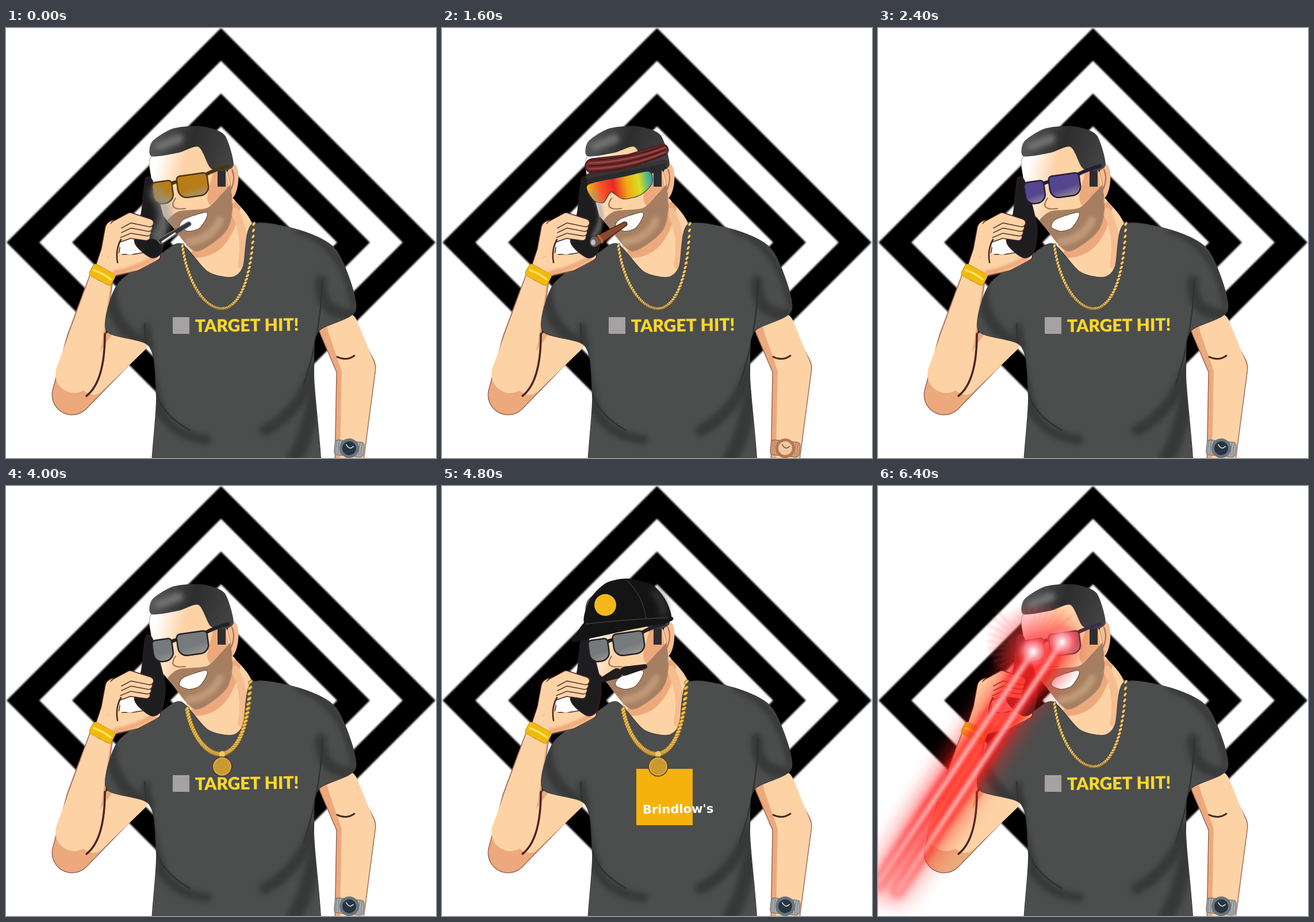
An HTML page with a canvas that plays this animation: 748 by 748 pixels, repeating every 7200 ms.

```html
<!DOCTYPE html>
<html lang="en">
<head>
<meta charset="utf-8">
<title>Wardrobe loop</title>
<style>
html, body { margin: 0; width: 100%; height: 100%; overflow: hidden; background: #fff; }
canvas { display: block; width: 748px; height: 748px; }
</style>
</head>
<body>
<canvas id="stage" width="748" height="748"></canvas>
<script>
const ctx = document.getElementById('stage').getContext('2d');
const STEP = 800;
const SKIN = '#fdd3a6', SHADE = '#eda97c', LINE = '#4a2520';

const GREY = { lens: '#777a7c', rim: '#202124' };
const VIOLET = { lens: '#55458f', rim: '#211e35' };
const GOLD = { lens: '#b97d16', rim: '#49350f' };
const ROSY = { lens: '#c05a68', rim: '#3a3046' };
const HATS = {
  black: { tone: '#141415', seam: '#353536', badge: '#f4b71c', tip: [226, 271] },
  grey: { tone: '#3b3b41', seam: '#28282c', badge: '#ef641c', tip: [212, 283] }
};

const LOOKS = [
  { shades: GOLD, chain: 'curb', smoke: 'dark' },
  { shades: GREY, hat: 'black', mask: true, white: true, chain: 'iced' },
  { band: true, chain: 'curb', smoke: 'cigar', rose: true },
  { shades: VIOLET, chain: 'curb' },
  { shades: VIOLET, hat: 'grey', chain: 'rope', pendant: '#f06a1d', rose: true },
  { shades: GREY, chain: 'rope', pendant: '#c99a32' },
  { shades: GREY, hat: 'black', moustache: true, diner: true, chain: 'rope', pendant: '#c99a32' },
  { shades: GREY, hat: 'black', chain: 'curb' },
  { shades: ROSY, chain: 'curb', laser: true }
];

function paintPath(color, edge, width = 1.5) {
  if (edge) {
    ctx.strokeStyle = edge;
    ctx.lineWidth = width * 2;
    ctx.stroke();
  }
  ctx.fillStyle = color;
  ctx.fill();
}

// Closed smooth outline through a few x, y pairs.
function outline(p) {
  const n = p.length;
  const at = i => p[(i + n) % n];
  ctx.beginPath();
  ctx.moveTo(p[0], p[1]);
  for (let i = 0; i < n; i += 2) {
    const pull = (k, a, b) => at(k) + (at(a) - at(b)) * 0.13;
    ctx.bezierCurveTo(pull(i, i + 2, i - 2), pull(i + 1, i + 3, i - 1),
      pull(i + 2, i, i + 4), pull(i + 3, i + 1, i + 5), at(i + 2), at(i + 3));
  }
  ctx.closePath();
}

function blob(color, p, edge, width) {
  outline(p);
  paintPath(color, edge, width);
}

// Rounded, tapering tube through [x, y, radius] joints.
function limb(color, edge, ...joints) {
  ctx.beginPath();
  for (let i = 1; i < joints.length; i++) {
    const [x, y, r] = joints[i - 1], [u, v, q] = joints[i];
    const a = Math.atan2(v - y, u - x);
    const open = Math.acos((r - q) / Math.hypot(u - x, v - y));
    ctx.moveTo(x + r * Math.cos(a + open), y + r * Math.sin(a + open));
    ctx.arc(x, y, r, a + open, a - open + 2 * Math.PI);
    ctx.arc(u, v, q, a - open, a + open);
    ctx.closePath();
  }
  paintPath(color, edge);
}

function oval(color, x, y, rx, ry = rx, turn = 0) {
  ctx.beginPath();
  ctx.ellipse(x, y, rx, ry, turn, 0, 7);
  paintPath(color);
}

function bend(color, width, x, y, cx, cy, u, v) {
  ctx.beginPath();
  ctx.moveTo(x, y);
  ctx.quadraticCurveTo(cx, cy, u, v);
  ctx.strokeStyle = color;
  ctx.lineWidth = width;
  ctx.lineCap = 'round';
  ctx.stroke();
}

function blend(x, y, u, v, ...colors) {
  const g = ctx.createLinearGradient(x, y, u, v);
  colors.forEach((c, i) => g.addColorStop(i / (colors.length - 1), c));
  return g;
}

function glow(x, y, r, ...colors) {
  const g = ctx.createRadialGradient(x, y, 0, x, y, r);
  colors.forEach((c, i) => g.addColorStop(i / (colors.length - 1), c));
  oval(g, x, y, r);
}

function within(draw) {
  ctx.save();
  ctx.clip();
  draw();
  ctx.restore();
}

function soft(px, draw) {
  ctx.save();
  ctx.filter = `blur(${px}px)`;
  draw();
  ctx.restore();
}

function turned(x, y, angle, draw) {
  ctx.save();
  ctx.translate(x, y);
  ctx.rotate(angle);
  draw();
  ctx.restore();
}

function label(text, font, color, x, y) {
  turned(x, y, -0.014, () => {
    ctx.font = font;
    ctx.fillStyle = color;
    ctx.fillText(text, 0, 0);
  });
}

function backdrop() {
  ctx.fillStyle = '#fff';
  ctx.fillRect(0, 0, 748, 748);
  soft(1.5, () => turned(374, 373, Math.PI / 4, () => {
    for (let i = 0; i < 6; i++) {
      const side = (373 - 57 * i) * Math.SQRT2;
      ctx.fillStyle = i % 2 ? '#fff' : '#000';
      ctx.fillRect(-side / 2, -side / 2, side, side);
    }
  }));
}

function arms() {
  const edge = '#99685a';
  limb(SHADE, edge, [575, 520, 30], [609, 592, 33], [597, 752, 24]);
  limb(SKIN, null, [586, 520, 27], [613, 592, 29], [601, 752, 20]);
  bend(LINE, 3, 576, 572, 592, 580, 606, 570);
  limb(SHADE, edge, [215, 538, 32], [115, 638, 34], [138, 545, 32], [167, 430, 19]);
  limb(SKIN, null, [218, 540, 31], [152, 616, 22]);
  limb(SKIN, null, [119, 602, 33], [137, 545, 30], [166, 430, 18]);
  bend(LINE, 3.5, 172, 532, 172, 615, 140, 640);
}

function watch(rose) {
  const metal = rose ? '#d6a077' : '#a9aeb0', dark = rose ? '#b87750' : '#6c747a';
  turned(597, 731, 0.1, () => {
    ctx.beginPath();
    ctx.roundRect(-25, -12, 50, 25, 5);
    paintPath(metal, '#63605e', 1);
    for (let x = -22; x <= 22; x += 4) bend(dark, 1, x, -11, x - 2, 0, x, 11);
    oval(dark, 0, 0, 17);
    oval(rose ? '#f0c9a3' : '#273541', 0, 0, 12);
    bend(rose ? '#7c4932' : '#dce5e9', 1.5, -6, -6, 1, 4, 7, -4);
  });
}

function shirt(white) {
  const fold = white ? '#c4c4c4' : '#373938', crease = white ? '#6d4748' : '#303231';
  outline([305, 376, 350, 424, 392, 434, 413, 415, 428, 342, 510, 352, 575, 388, 608, 490, 543, 528,
    535, 600, 535, 900, 268, 900, 262, 640, 249, 553, 175, 526, 195, 445, 270, 393]);
  paintPath(white ? '#fff' : '#4c4e4d', white ? '#82615e' : '#393536', 1);
  within(() => {
    soft(5, () => {
      bend(fold, 20, 182, 450, 180, 520, 245, 552);
      bend(fold, 14, 244, 520, 250, 600, 268, 660);
      bend(fold, 16, 264, 660, 290, 710, 350, 716);
      bend(fold, 20, 538, 590, 510, 670, 450, 700);
      bend(fold, 26, 540, 620, 530, 700, 500, 752);
      bend(fold, 20, 548, 440, 545, 500, 606, 498);
      bend(fold, 12, 510, 352, 585, 375, 606, 480);
    });
    bend(crease, 2.5, 241, 515, 246, 610, 270, 655);
    bend(crease, 2.5, 270, 655, 285, 680, 320, 700);
    bend(crease, 2.5, 550, 440, 548, 530, 518, 620);
  });
}

function bear() {
  const fur = blend(340, 530, 460, 570, '#e9e9e6', '#8d8d8b', '#343434');
  soft(1, () => {
    limb(fur, null, [375, 543, 24], [408, 548, 24], [455, 560, 13]);
    limb(fur, null, [375, 545, 14], [338, 570, 10]);
    limb(fur, null, [360, 524, 15], [380, 540, 20], [376, 566, 7]);
  });
  oval('#222', 366, 522, 4, 3);
}

function print(look) {
  if (look.white) return bear();
  ctx.fillStyle = look.diner ? '#f5b20d' : '#a6a2a3';
  if (look.diner) {
    ctx.fillRect(338, 492, 98, 98);
    label("Brindlow's", 'bold 21px "DejaVu Sans", sans-serif', '#fff', 349, 570);
  } else {
    ctx.fillRect(290, 503, 29, 29);
    label('TARGET HIT!', '900 30px Lato, sans-serif', '#fbd72b', 329, 529);
  }
}

function neck() {
  outline([315, 375, 385, 300, 402, 305, 428, 343, 416, 412, 392, 434, 350, 422]);
  paintPath(SKIN, '#99685a', 0.5);
  within(() => {
    bend(SHADE, 16, 330, 392, 385, 390, 400, 310);
    bend('#f5bd90', 14, 398, 320, 420, 360, 410, 412);
  });
}

function face() {
  oval('#f6bd91', 393, 267, 11, 31, 0.1);
  bend('#aa6a50', 2, 393, 246, 400, 262, 391, 282);
  outline([255, 222, 335, 205, 384, 250, 393, 318, 380, 356, 330, 388, 289, 344, 258, 304, 253, 262]);
  paintPath(blend(256, 260, 350, 280, '#fff', SKIN, SKIN), '#96705e', 0.7);
  within(() => {
    limb(SHADE, null, [372, 245, 10], [370, 295, 20]);
    blob('#a67f62', [278, 340, 300, 319, 350, 313, 378, 286, 400, 270, 400, 360, 330, 400, 285, 370]);
    soft(3, () => bend('#bf9877', 14, 318, 372, 355, 368, 372, 335));
  });
  blob('#fff', [302, 346, 310, 333, 347, 321, 348, 331, 336, 348, 318, 353], '#5e4136', 1);
  bend('#a16c50', 2, 295, 296, 280, 318, 312, 314);
}

function hair() {
  ctx.fillStyle = '#2e2c2d';
  ctx.fillRect(368, 240, 14, 36);
  blob(blend(255, 180, 390, 225, '#5a5a5a', '#2e2d2e', '#424243'),
    [253, 223, 254, 198, 290, 175, 340, 171, 380, 186, 396, 236, 382, 248, 356, 244, 335, 207, 300, 217]);
  soft(4, () => limb('#717171', null, [266, 206, 7], [300, 193, 8]));
}

function headband() {
  limb('#353536', null, [258, 260, 8], [320, 250, 8], [388, 234, 5]);
  limb('#722c2d', '#451c1e', [262, 240, 12], [325, 232, 11], [384, 212, 9]);
  for (let i = -2; i <= 2; i++) {
    bend(i % 2 ? '#9c4d48' : '#47191c', 2, 256, 240 + i * 5, 325, 238 + i * 5, 388, 212 + i * 4);
  }
}

function hand() {
  limb(SKIN, LINE, [170, 424, 16], [181, 388, 15], [188, 350, 15]);
  limb(SKIN, LINE, [190, 412, 17], [225, 408, 14], [260, 396, 8]);
  limb(SKIN, null, [174, 424, 16], [192, 408, 17]);
  soft(2, () => bend(SHADE, 9, 190, 426, 225, 420, 258, 400));
  oval('#fff', 215, 378, 17, 16);
  blob('#1d1d20', [243, 263, 256, 269, 276, 345, 270, 390, 252, 399, 224, 372, 236, 320], '#421d22', 1);
  for (let i = 3; i >= 0; i--) {
    limb(SKIN, LINE, [190 + i, 344 + i * 7, 8], [216, 330 + i * 9, 8], [250 - i * 2, 339 + i * 8, 6]);
  }
  limb(SKIN, null, [182, 384, 12], [188, 352, 13]);
  bend(LINE, 2.5, 194, 408, 190, 385, 200, 368);
  turned(167, 429, 0.5, () => {
    ctx.beginPath();
    ctx.roundRect(-21, -11, 43, 22, 5);
    paintPath('#f2b90d', '#bf8415', 0.7);
    bend('#ffe15b', 4, -16, 0, 0, -3, 17, 0);
  });
}

function glasses({ lens, rim }) {
  bend(rim, 6, 345, 256, 364, 246, 386, 240);
  bend(rim, 6, 284, 274, 292, 266, 304, 268);
  [[273, 286, 32], [325, 274, 51]].forEach(([x, y, w]) => turned(x, y, -0.14, () => {
    ctx.beginPath();
    ctx.roundRect(-w / 2, -18, w, 36, [5, 5, 14, 14]);
    paintPath(blend(0, -18, 8, 24, lens, lens, '#a09a92'), rim, 2.5);
  }));
}

function visor() {
  limb('#292c2e', null, [262, 270, 10], [320, 258, 9], [386, 241, 5]);
  blob(blend(255, 285, 365, 266, '#f2b321', '#f6572b', '#e72824', '#f1a719', '#d7df21', '#26a3b2'),
    [254, 273, 320, 258, 360, 250, 365, 270, 345, 290, 315, 297, 294, 285, 281, 303, 264, 299], '#292c2e', 1);
}

function hat({ tone, seam, badge, tip }) {
  blob(tone, [250, 242, 257, 198, 285, 169, 322, 161, 366, 172, 391, 202, 396, 236, 330, 245]);
  blob(tone, [...tip, 238, 250, 255, 234, 320, 228, 394, 226, 396, 236, 318, 252, 268, 263]);
  bend(seam, 2, 250, 240, 320, 232, 392, 229);
  bend(seam, 1.5, 320, 163, 350, 190, 355, 231);
  soft(6, () => bend(seam, 12, 370, 185, 385, 200, 386, 222));
  oval(badge, 284, 207, 19);
}

function mask() {
  bend('#d9e9f0', 2, 362, 290, 376, 278, 382, 262);
  outline([268, 308, 301, 299, 359, 287, 376, 318, 387, 342, 360, 374, 326, 389, 284, 374]);
  paintPath(blend(270, 300, 378, 375, '#b5dbef', '#8cc2e4', '#a9d2eb'), '#6fa5ca', 0.7);
  within(() => {
    for (let y = 326; y < 380; y += 15) {
      bend('#78afd4', 2, 268, y, 325, y + 4, 388, y - 14);
      bend('#c6e4f3', 2, 268, y + 4, 325, y + 8, 388, y - 10);
    }
  });
}

function moustache() {
  limb('#211d1e', null, [276, 338, 4], [304, 326, 9]);
  limb('#211d1e', null, [318, 322, 8], [353, 314, 4]);
}

// Row of tilted links along a cubic curve.
function links(count, rx, ry, color, edge, twist, ...c) {
  for (let i = 0; i <= count; i++) {
    const t = i / count, s = 1 - t;
    const point = k => s ** 3 * c[k] + 3 * s * s * t * c[k + 2] + 3 * s * t * t * c[k + 4] + t ** 3 * c[k + 6];
    const slope = k => s * s * (c[k + 2] - c[k]) + 2 * s * t * (c[k + 4] - c[k + 2]) + t * t * (c[k + 6] - c[k + 4]);
    const turn = Math.atan2(slope(1), slope(0)) + twist;
    ctx.beginPath();
    ctx.ellipse(point(0), point(1), rx, ry, turn, 0, 7);
    paintPath(color, edge, 1);
  }
}

function chain(look) {
  if (look.chain === 'curb') {
    links(58, 3.6, 2, '#ecc878', '#5a421c', 0.5, 307, 379, 322, 500, 424, 561, 431, 341);
  } else if (look.chain === 'rope') {
    links(52, 4, 2, '#ecc056', '#a0701f', 0.8, 315, 388, 330, 478, 418, 522, 425, 341);
    oval('#f3c763', 376, 467, 5, 6);
    oval('#55351c', 376, 488, 17.5);
    oval('#d5a752', 376, 488, 16);
    oval(look.pendant, 376, 488, 13.5);
  } else {
    links(56, 3, 2.4, '#f4e9c2', '#93702f', 0, 286, 368, 300, 470, 440, 498, 435, 343);
    links(40, 5, 4, '#242220', null, 0, 289, 373, 318, 440, 410, 439, 426, 342);
    links(15, 10, 5, '#e9e1cf', '#a4772f', 0.75, 289, 373, 318, 440, 410, 439, 426, 342);
    dollar();
  }
}

function dollar() {
  oval('#b48738', 369, 453, 5, 9);
  ctx.font = 'bold 60px "DejaVu Sans", sans-serif';
  ctx.textAlign = 'center';
  ctx.lineWidth = 5;
  ctx.strokeStyle = '#a97c30';
  ctx.strokeText('$', 369, 513);
  ctx.fillStyle = '#cfd8da';
  ctx.fillText('$', 369, 513);
  ctx.textAlign = 'left';
  [364, 374].forEach(x => bend('#b58b42', 3, x, 468, x, 490, x, 517));
}

function smoke(kind) {
  const cigar = kind === 'cigar';
  soft(cigar ? 3 : 6, () => bend('#92929299', cigar ? 8 : 24, 264, 362, 290, 325, 262, 287));
  limb(cigar ? '#8a4a2b' : '#353638', cigar ? '#402016' : '#777', [318, 341, 3], [270, 370, cigar ? 7 : 4]);
  if (cigar) {
    bend('#c96835', 3, 272, 361, 277, 366, 279, 373);
    oval('#66605d', 265, 372, 8, 9);
    oval('#c5c0ba', 263, 373, 4, 5);
  } else {
    bend('#eee', 3, 294, 357, 284, 364, 272, 372);
    oval('#191a1c', 254, 382, 14, 15);
  }
}

function lasers() {
  const beams = [[270, 288, 0, 692], [320, 271, 34, 704]];
  const pass = (rgb, alpha, width, blur) => soft(blur, () => beams.forEach(([x, y, u, v]) => {
    const color = a => `rgba(${rgb}, ${a})`;
    bend(blend(x, y, u, v, color(alpha), color(alpha), color(alpha), color(alpha * 0.5)), width, x, y, x, y, u, v);
  }));
  glow(275, 284, 85, '#ff2a2a99', '#ff404066', '#ff404000');
  soft(2, () => {
    for (let i = 0; i < 22; i++) {
      const a = 2.2 + i * 0.16, r = 60 + i * 37 % 34;
      bend('#ff505040', 3, 270, 284, 270, 284, 270 + r * Math.cos(a), 284 + r * Math.sin(a));
    }
  });
  pass('255, 36, 36', 0.4, 64, 14);
  pass('255, 24, 24', 0.7, 28, 6);
  pass('255, 200, 200', 0.9, 8, 3);
  beams.forEach(([x, y]) => glow(x, y, 30, '#fff', '#ffb0bcaa', '#ff506000'));
}

function paint(look) {
  backdrop();
  arms();
  watch(look.rose);
  neck();
  shirt(look.white);
  print(look);
  face();
  hair();
  if (look.band) headband();
  hand();
  if (look.shades) glasses(look.shades);
  else visor();
  if (look.moustache) moustache();
  if (look.mask) mask();
  if (look.hat) hat(HATS[look.hat]);
  chain(look);
  if (look.smoke) smoke(look.smoke);
  if (look.laser) lasers();
}

let shown = -1;
function tick(now) {
  const index = Math.floor(now / STEP) % LOOKS.length;
  if (index !== shown) {
    paint(LOOKS[index]);
    shown = index;
  }
  requestAnimationFrame(tick);
}
tick(performance.now());
</script>
</body>
</html>
```
